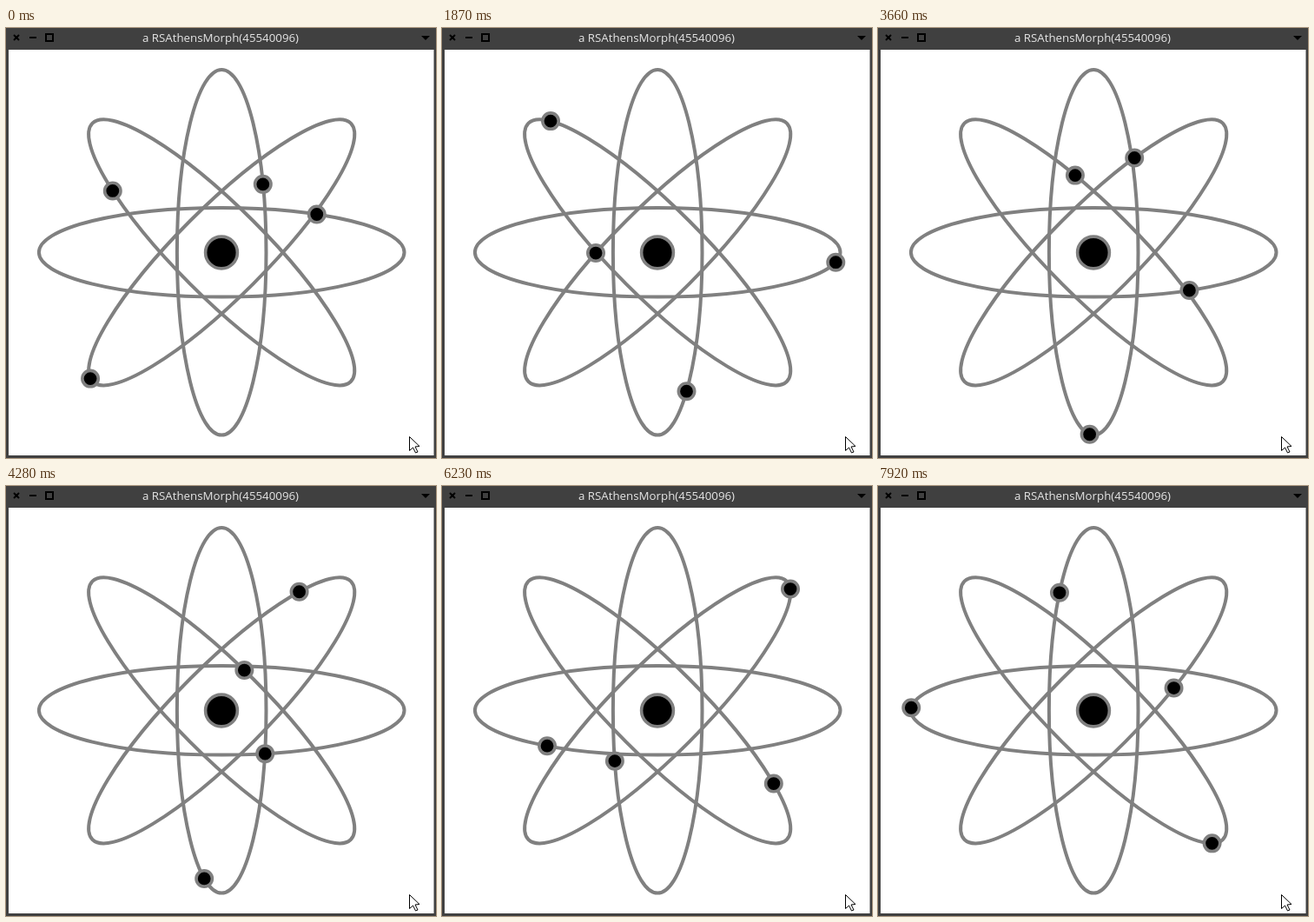
These frames come from a looping animation (495x495 px, 8 s). An HTML page with a canvas:

```html
<!DOCTYPE html>
<html lang="en">
<head>
<meta charset="utf-8">
<title>Atom</title>
<style>
  html, body { margin: 0; width: 100%; height: 100%; overflow: hidden; background: #404040; }
  canvas { display: block; width: 495px; height: 495px; }
</style>
</head>
<body>
<canvas id="stage"></canvas>
<script>
const SIZE = 495, LOOP = 8000, STEP = 77.5;
const CX = 248.2, CY = 258.3, LONG = 210.3, SHORT = 51.3;
const GRAY = '#808080', FRAME = '#404040';

// Tilt of each orbit and starting phase of its electron, in degrees.
const orbits = [
  { tilt: 0, phase: -58.6 },
  { tilt: 90, phase: -111.9 },
  { tilt: 45, phase: 131.3 },
  { tilt: -45, phase: 184.6 }
];

// Shared rotation: [step, degrees]. The speed varies along the way.
const turn = [[0, 0], [8, 24], [24, 71.4], [47, 117], [64, 154.9], [80, 185.8], [102, 242]];

const canvas = document.getElementById('stage');
const ctx = canvas.getContext('2d');
const scale = window.devicePixelRatio || 1;
canvas.width = canvas.height = Math.round(SIZE * scale);
ctx.scale(scale, scale);

const rad = deg => deg * Math.PI / 180;

function turnAt(step) {
  let i = 1;
  while (i < turn.length - 1 && step > turn[i][0]) i++;
  const [s0, a0] = turn[i - 1], [s1, a1] = turn[i];
  return a0 + (a1 - a0) * (step - s0) / (s1 - s0);
}

function polyline(points, close) {
  ctx.beginPath();
  points.forEach(([x, y]) => ctx.lineTo(x, y));
  if (close) ctx.closePath();
}

function ball(x, y, r, line) {
  ctx.beginPath();
  ctx.arc(x, y, r, 0, 2 * Math.PI);
  ctx.fillStyle = '#000';
  ctx.fill();
  ctx.strokeStyle = GRAY;
  ctx.lineWidth = line;
  ctx.stroke();
}

function drawWindow() {
  ctx.fillStyle = FRAME;
  ctx.fillRect(0, 0, SIZE, SIZE);
  ctx.fillStyle = '#fff';
  ctx.fillRect(3, 25, 489.5, 467);

  ctx.strokeStyle = '#000';
  ctx.lineWidth = 2;
  polyline([[9, 8], [15, 14]]);
  ctx.stroke();
  polyline([[15, 8], [9, 14]]);
  ctx.stroke();
  polyline([[27, 11], [35, 11]]);
  ctx.stroke();
  ctx.strokeRect(46, 7, 8, 8);
  ctx.fillStyle = '#000';
  polyline([[478, 9], [488, 9], [483, 14]], true);
  ctx.fill();

  ctx.fillStyle = '#e6e6e6';
  ctx.font = '13.3px "Open Sans", "Noto Sans", sans-serif';
  ctx.textAlign = 'center';
  ctx.fillText('a RSAthensMorph(45540096)', 247, 16);
}

function drawOrbit({ tilt }) {
  ctx.beginPath();
  ctx.ellipse(CX, CY, LONG, SHORT, rad(tilt), 0, 2 * Math.PI);
  ctx.strokeStyle = GRAY;
  ctx.lineWidth = 4;
  ctx.stroke();
}

function drawElectron({ tilt, phase }, angle) {
  const a = rad(phase + angle), r = rad(tilt);
  const u = LONG * Math.cos(a), v = SHORT * Math.sin(a);
  const x = CX + u * Math.cos(r) - v * Math.sin(r);
  const y = CY + u * Math.sin(r) + v * Math.cos(r);
  ball(x, y, 9.2, 3.6);
}

function drawPointer() {
  polyline([[464.5, 470.5], [464.5, 486.5], [468.5, 483], [471.5, 489],
    [474, 488], [471, 482], [476, 481.5]], true);
  ctx.fillStyle = '#fff';
  ctx.fill();
  ctx.strokeStyle = '#000';
  ctx.lineWidth = 1;
  ctx.stroke();
}

function draw(now) {
  const angle = turnAt(Math.floor((now % LOOP) / STEP));
  drawWindow();
  orbits.forEach(drawOrbit);
  ball(CX - 0.2, CY + 0.2, 18.4, 3.6);
  orbits.forEach(orbit => drawElectron(orbit, angle));
  drawPointer();
}

const start = performance.now();
function tick() {
  draw(performance.now() - start);
  requestAnimationFrame(tick);
}
tick();
</script>
</body>
</html>
```
